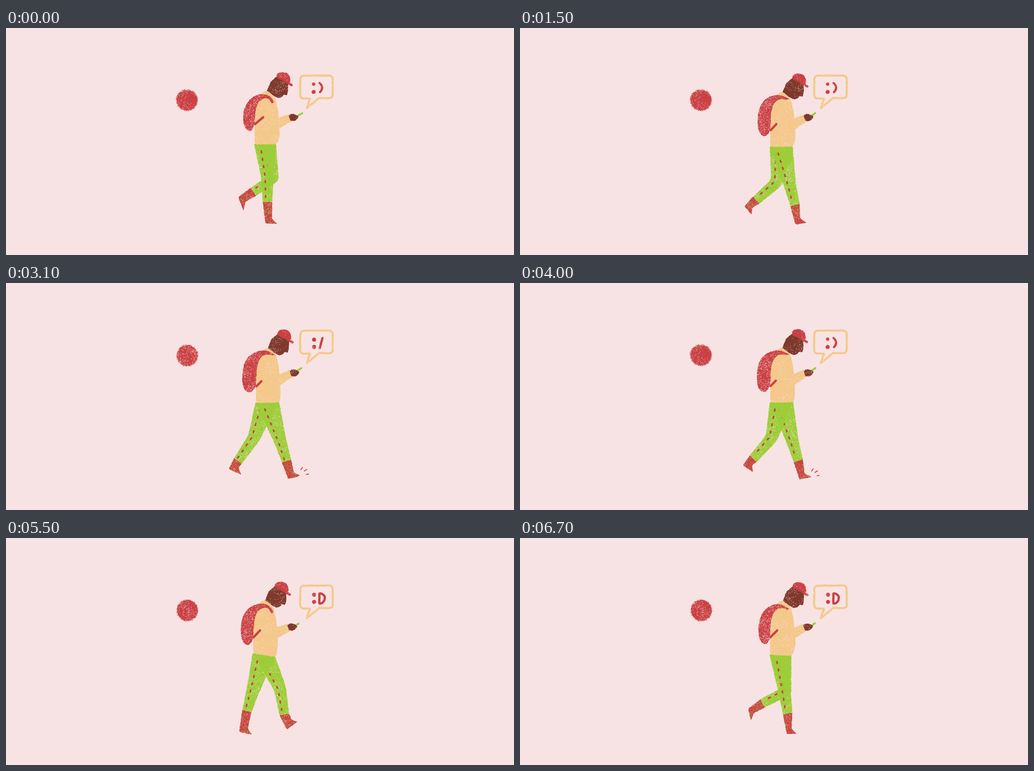
Recreate the animation shown at these times as an HTML page with a canvas. Size 1118 by 501 pixels, loop 6800 ms.

```html
<!DOCTYPE html>
<html lang="en">
<head>
<meta charset="utf-8">
<title>Walking and texting</title>
<style>
html, body { margin: 0; width: 100%; height: 100%; overflow: hidden; background: #f7e3e3; }
canvas { display: block; }
</style>
</head>
<body>
<canvas id="stage" width="1118" height="501"></canvas>
<script>
const W = 1118, H = 501, STEP = 100, CYCLE = 17, HALF = CYCLE / 2;
const BG = '#f7e3e3', RED = '#ca4144', SAND = '#f4c88a', GREEN = '#9dcd38', BROWN = '#7f392c';

const ctx = document.getElementById('stage').getContext('2d');
const sheet = document.createElement('canvas');
sheet.width = W;
sheet.height = H;
const ink = sheet.getContext('2d');
ink.lineCap = ink.lineJoin = 'round';

// One leg over a full cycle: phase, knee, boot top, heel, toe.
const LEG = [
  [0, 575, 330, 575.5, 384, 571, 432, 597, 432],
  [1.5, 575, 330, 568, 406, 561, 432, 587, 431],
  [4, 541, 345, 530, 382, 513, 428, 542, 434],
  [5.5, 545, 343, 510.5, 392.5, 490, 411, 518, 423],
  [7.5, 585, 338, 534, 365, 502, 377, 508, 403],
  [8.5, 588, 332, 544.5, 361.5, 511, 373, 523, 404],
  [10, 614, 324, 585.5, 367.5, 554, 393, 579, 416],
  [12.5, 603, 332, 612.5, 389.5, 618, 423, 642, 405],
  [14, 604, 350, 617.5, 393, 621, 433, 649, 425],
  [16, 582, 338, 589, 387, 587, 433, 609, 432]
];

// Upper body over one step: phase, waist back, waist front, head shift,
// pack left/top/bottom, strap end, lower strap end, hand, phone base, phone tip.
const BODY = [
  [0, 546, 256, 594, 255, 0, 0, 522, 147, 227, 587, 164, 566, 197, 633, 197, 643, 193, 652, 188],
  [1.5, 552, 260, 600, 252, 2, -2, 516, 141, 234, 588, 152, 561, 201, 635, 191, 641, 187, 646, 184],
  [4, 543, 254, 592, 261, -4, -1, 517, 146, 236, 586, 164, 559, 204, 630, 196, 639, 192, 644, 189],
  [5.5, 549, 264, 601, 262, 2, 5, 520, 150, 241, 590, 157, 562, 217, 635, 198, 644, 192, 650, 188],
  [7.5, 549, 257, 597, 258, 4, 0, 525, 147, 234, 590, 156, 566, 204, 634, 196, 643, 193, 649, 188]
];

let seed = 1;
function rnd() {
  seed = (seed + 0x6d2b79f5) | 0;
  let t = Math.imul(seed ^ (seed >>> 15), 1 | seed);
  t = (t + Math.imul(t ^ (t >>> 7), 61 | t)) ^ t;
  return ((t ^ (t >>> 14)) >>> 0) / 4294967296;
}
const spread = a => (rnd() * 2 - 1) * a;
const mix = (a, b, k) => [a[0] + (b[0] - a[0]) * k, a[1] + (b[1] - a[1]) * k];
const dist = (a, b) => Math.hypot(b[0] - a[0], b[1] - a[1]);
const unit = (a, b) => {
  const d = dist(a, b) || 1;
  return [(b[0] - a[0]) / d, (b[1] - a[1]) / d];
};
const shift = (pts, x, y) => pts.map(p => [p[0] + x, p[1] + y]);

// Periodic smooth interpolation through keyed rows.
function pose(keys, period, phase) {
  const n = keys.length, p = ((phase % period) + period) % period;
  const key = j => {
    const turn = Math.floor(j / n), row = keys[j - turn * n];
    return { t: row[0] + turn * period, row };
  };
  let i = n - 1;
  while (keys[i][0] > p) i--;
  const [a, b, c, d] = [key(i - 1), key(i), key(i + 1), key(i + 2)];
  const span = c.t - b.t, u = (p - b.t) / span, u2 = u * u, u3 = u2 * u;
  return b.row.map((v, k) => {
    const m0 = (c.row[k] - a.row[k]) / (c.t - a.t) * span;
    const m1 = (d.row[k] - v) / (d.t - b.t) * span;
    return (2 * u3 - 3 * u2 + 1) * v + (u3 - 2 * u2 + u) * m0
      + (3 * u2 - 2 * u3) * c.row[k] + (u3 - u2) * m1;
  });
}

// Tile of patchy specks, used both for worn holes and for coloured grain.
function makeGrain(start) {
  const size = 256, tile = document.createElement('canvas');
  tile.width = tile.height = size;
  const g = tile.getContext('2d'), w = Math.PI * 2 / size;
  g.fillStyle = GREEN;
  seed = start;
  for (let i = 0; i < 6500; i++) {
    const x = rnd() * size, y = rnd() * size;
    const patch = 0.5 + 0.3 * Math.sin(x * w * 5 + 2 * Math.sin(y * w * 3)) + 0.2 * Math.sin(y * w * 7 + start);
    if (rnd() < patch) g.fillRect(x, y, 0.7 + rnd() * 0.9, 0.7 + rnd() * 0.7);
  }
  return ink.createPattern(tile, 'repeat');
}
const grains = [11, 23, 37].map(makeGrain);
let grain = grains[0];

function speckle(mode, passes) {
  ink.globalCompositeOperation = mode;
  ink.fillStyle = grain;
  for (let i = 0; i < passes; i++) {
    const x = Math.floor(rnd() * 256), y = Math.floor(rnd() * 256);
    ink.save();
    ink.globalAlpha = 0.75;
    ink.translate(x, y);
    ink.fillRect(-x, -y, W, H);
    ink.restore();
  }
  ink.globalCompositeOperation = 'source-over';
}

// Draw on the sheet, wear it down, lay it on the stage.
function print(color, draw, holes = 1, tint = 0) {
  ink.clearRect(0, 0, W, H);
  ink.fillStyle = ink.strokeStyle = color;
  draw();
  if (tint) speckle('source-atop', tint);
  if (holes) speckle('destination-out', holes);
  ctx.drawImage(sheet, 0, 0);
}

// Closed path with rounded corners and a slightly rough edge.
function trace(pts, radius = 4, rough = 0.5) {
  const n = pts.length, line = [];
  pts.forEach((b, i) => {
    const a = pts[(i + n - 1) % n], c = pts[(i + 1) % n], r = b[2] ?? radius;
    const from = mix(b, a, Math.min(0.5, r / (dist(a, b) || 1)));
    const to = mix(b, c, Math.min(0.5, r / (dist(b, c) || 1)));
    for (let k = 0; k <= 5; k++) line.push(mix(mix(from, b, k / 5), mix(b, to, k / 5), k / 5));
  });
  ink.beginPath();
  line.forEach((p, i) => {
    const q = line[(i + 1) % line.length], steps = Math.max(1, Math.round(dist(p, q) / 2.2));
    for (let k = 0; k < steps; k++) {
      const [x, y] = mix(p, q, k / steps);
      ink.lineTo(x + spread(rough), y + spread(rough));
    }
  });
  ink.closePath();
}
const blob = (pts, radius, rough) => { trace(pts, radius, rough); ink.fill(); };

function stroke(a, b, width) {
  ink.lineWidth = width;
  ink.beginPath();
  ink.moveTo(...a);
  ink.lineTo(...b);
  ink.stroke();
}
function dot(x, y, r) {
  const pts = [];
  for (let i = 0; i < 8; i++) {
    const a = i * Math.PI / 4;
    pts.push([x + Math.cos(a) * r * 1.06, y + Math.sin(a) * r * 1.06]);
  }
  blob(pts, 3, 0.3);
}

function sun(boil) {
  const cx = boil ? 399 : 398.3, cy = boil ? 160 : 159.2;
  print(RED, () => {
    ink.beginPath();
    for (let i = 0; i < 150; i++) {
      const a = i / 150 * Math.PI * 2, r = 22.9 + spread(1.1);
      ink.lineTo(cx + Math.cos(a) * r, cy + Math.sin(a) * r);
    }
    ink.fill();
    for (let i = 0; i < 90; i++) {
      const a = rnd() * Math.PI * 2, r = 23 + rnd() * 1.6;
      ink.fillRect(cx + Math.cos(a) * r - 0.5, cy + Math.sin(a) * r - 0.5, 1, 1);
    }
  }, 1 + boil);
}

function bubble(boil) {
  print(SAND, () => {
    ink.lineWidth = 4.4;
    trace([[648, 105, 9], [719, 105, 9], [719, 155, 8], [689, 154.5, 1], [662, 177, 1], [669, 156, 1], [647, 155.5, 9]], 4, 0.4);
    ink.stroke();
  });
  print(RED, () => {
    const x = boil ? 678 : 677;
    dot(x, boil ? 125 : 124, boil ? 4.7 : 4);
    dot(x, 141, 4.6);
    if (boil === 0) {
      ink.lineWidth = 4.8;
      ink.beginPath();
      ink.moveTo(690, 121.5);
      ink.quadraticCurveTo(701, 131, 691, 141.5);
      ink.stroke();
    } else if (boil === 1) {
      ink.lineWidth = 5;
      trace([[689.7, 122.5, 1], [694, 122.5, 3], [701.5, 127, 6], [701.5, 138, 6], [695, 144.5, 3], [689.7, 144.5, 1]], 4, 0.3);
      ink.stroke();
    } else {
      stroke([696.5, 121.5], [690.5, 143.5], 5);
    }
  });
}

function leg(phase, back, front, landing) {
  const v = pose(LEG, CYCLE, phase);
  const knee = [v[1], v[2]], cuff = [v[3], v[4]], heel = [v[5], v[6]], toe = [v[7], v[8]];
  const thigh = unit(mix(back, front, 0.5), knee), shin = unit(knee, cuff);
  const bend = unit([0, 0], [thigh[0] + shin[0], thigh[1] + shin[1]]);
  const beside = (p, d, w) => [p[0] + d[1] * w, p[1] - d[0] * w];
  const cuffB = beside(cuff, shin, -10.5), cuffF = beside(cuff, shin, 10.5);

  print(GREEN, () => blob([
    [...back, 2], beside(knee, bend, -13.5), [...cuffB, 1],
    [...cuffF, 1], beside(knee, bend, 13.5), [...front, 2]
  ], 9), 2);

  const sole = mix(heel, toe, 0.55);
  print(RED, () => blob([
    [...cuffB, 1], heel, [...toe, 3],
    [sole[0] - shin[0] * 11, sole[1] - shin[1] * 11], [...cuffF, 1]
  ], 4), 1, 3);

  // dashed seam
  print(RED, () => {
    const seam = [mix(back, front, 0.28), beside(knee, bend, -4.5), beside(cuff, shin, -4)];
    const first = dist(seam[0], seam[1]), total = first + dist(seam[1], seam[2]);
    for (let s = 18; s < total - 6; s += 16.5) {
      const upper = s < first;
      const p = upper ? mix(seam[0], seam[1], s / first) : mix(seam[1], seam[2], (s - first) / (total - first));
      const d = upper ? unit(seam[0], seam[1]) : unit(seam[1], seam[2]);
      stroke([p[0] - d[0] * 2, p[1] - d[1] * 2], [p[0] + d[0] * 2, p[1] + d[1] * 2], 3.4);
    }
  }, 0);

  if (landing) print(RED, () => {
    const [x, y] = toe;
    stroke([x, y - 13], [x + 3.5, y - 18], 2);
    stroke([x + 7.5, y - 10], [x + 13, y - 13.5], 2);
    stroke([x + 12, y - 2.5], [x + 17, y - 3.5], 1.8);
  }, 0);
}

function walker(frame) {
  const [, bx, by, fx, fy, hx, hy, left, top, low, ex, ey, sx, sy, handX, handY, px, py, tx, ty] = pose(BODY, HALF, frame);
  const back = [bx, by], front = [fx, fy];

  leg(frame + HALF, back, front, frame === 6);
  leg(frame, back, front, frame === 14);

  // head, then the jumper over the neck
  print(BROWN, () => blob(shift([
    [573, 142], [582, 119], [597, 106], [612, 111], [621, 121], [620.5, 140], [618.5, 149.5],
    [611.5, 146.5], [608, 152], [600, 155], [593, 152], [590, 150]
  ], hx, hy), 4), 1);
  print(RED, () => {
    blob(shift([
      [595, 105], [600, 98.5], [610, 97], [620, 100], [625.5, 109], [626, 120], [619, 122], [608, 116], [597, 111]
    ], hx, hy), 6);
    stroke([617 + hx, 119 + hy], [628.5 + hx, 126 + hy], 5);
  }, 1);
  print(SAND, () => {
    blob([
      [bx + 1, by + 1], [bx + 1, 215], ...shift([
        [552, 162], [561, 145], [573, 136.5], [592, 152], [598, 178], [601, 205], [602.5, 238]
      ], hx, hy), [fx + 2, fy + 2]
    ], 8);
    blob([
      [592 + hx, 200 + hy], [handX - 10, handY - 6.5], [handX - 3, handY + 8.5], [592 + hx, 227 + hy]
    ], 3);
  }, 1);

  print(RED, () => {
    blob([
      [ex + 3, ey, 2], [ex - 3, top + 6], [ex - 15, top - 1], [ex - 33, top - 1], [left + 15, top + 9],
      [left + 3, top + 28], [left - 1, low - 34], [left + 2, low - 8], [left + 15, low + 3],
      [bx, low - 8], [bx + 2, low - 28], [bx + 3, top + 36], [bx + 9, top + 16],
      [ex - 18, top + 7], [ex - 8, top + 9], [ex - 2, ey + 3, 2]
    ], 14);
  }, 3);
  print(RED, () => stroke([bx + 2, Math.min(low - 13, sy + 15)], [sx, sy], 5), 0);

  print(GREEN, () => stroke([px - 2, py + 1], [tx, ty], 4.2), 0);
  print(BROWN, () => blob(shift([
    [-11, -4], [-4, -8], [4, -6], [11.5, -2], [8, 4], [2, 8.5], [-7, 8]
  ], handX, handY), 3), 1);
}

function render(frame) {
  const boil = frame % 3;
  ctx.fillStyle = BG;
  ctx.fillRect(0, 0, W, H);
  grain = grains[boil];
  seed = 500 + boil;
  sun(boil);
  bubble(boil);
  seed = 900 + frame * 31;
  walker(frame);
}

const start = performance.now();
let shown = -1;
function tick() {
  const frame = Math.floor((performance.now() - start) / STEP) % CYCLE;
  if (frame !== shown) render(shown = frame);
  requestAnimationFrame(tick);
}
tick();
</script>
</body>
</html>
```
